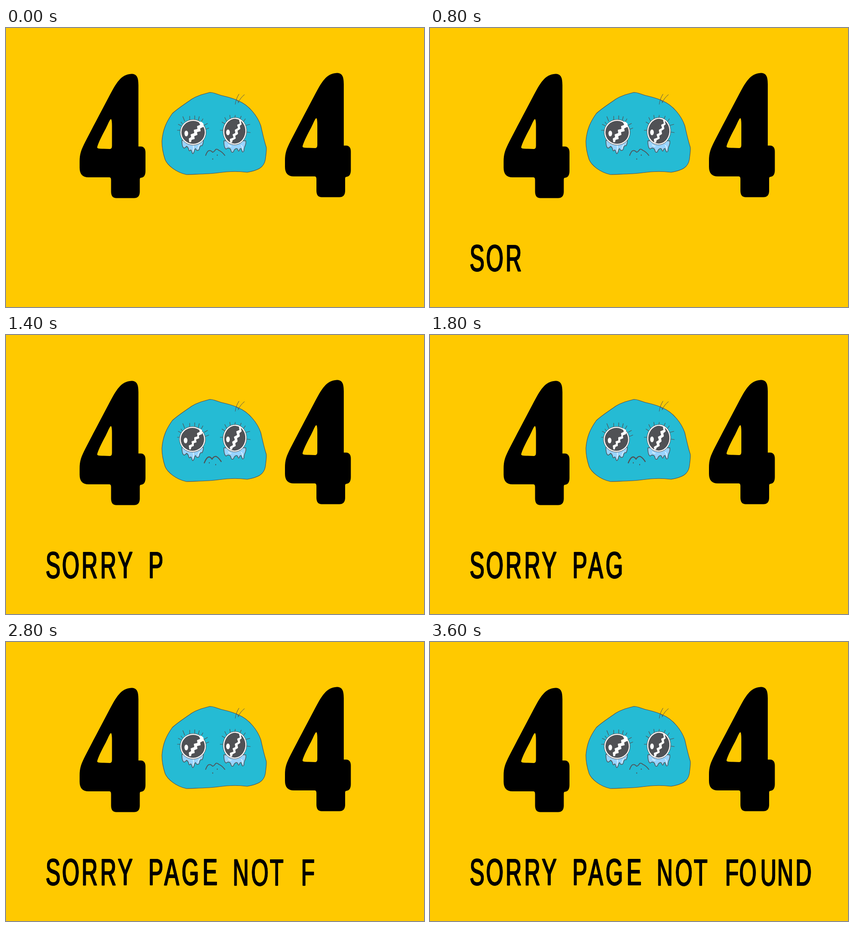
An HTML page with a canvas for the animation above (3.8 s loop, 917 by 611 pixels).

```html
<!DOCTYPE html>
<html lang="en">
<head>
<meta charset="utf-8">
<title>404</title>
<style>
  html, body { margin: 0; width: 100%; height: 100%; overflow: hidden; background: #ffc900; }
  canvas { display: block; }
</style>
</head>
<body>
<canvas id="stage" width="917" height="611"></canvas>
<script>
const ctx = document.getElementById('stage').getContext('2d');
const STEP = 200, STEPS = 19;
const YELLOW = '#ffc900', BLUE = '#25bbd4', DARK = '#505155', TEAR = '#99d4ff';

const four = new Path2D(
  'M275 100.5C287 100.5 290.5 108 290.5 125V259.5H296Q306 260 306 273V313Q306 327 296 328Q293.5 328 293.5 332' +
  'V359Q293 372.5 281 372.5H242Q230.5 372.5 230.5 358V333Q230.5 327 227 327H181Q161.5 327 161.5 306V293' +
  'C161.5 275 165 267 174 249C189 220 207 186 225 152C242 120 252 101.5 275 100.5Z' +
  'M200 261C203 250 212 233 219 220C224 210 228 199 230.5 199.5Q232.5 201 232.5 215V258' +
  'Q232.5 265 228 265L214 264.5Q199 265 200 261Z');

const head = new Path2D(
  'M447 141C458 141 463 146 478 149C495 153 505 157 511 160C533 169 552 193 559 214' +
  'C563 231 566 246 571 261C572 268 570 279 569 288C566 306 552 312 529 316' +
  'C514 314 492 313 466 317C447 320 420 320 396 321C372 316 354 300 349 288' +
  'C343 270 342 256 342 248C344 222 352 205 365 187C377 176 390 168 407 156C420 148 432 145 447 141Z');
const hair = new Path2D('M511 145Q504 156 503 167M523 146Q514 153 509 164M506 157L511 163');

const lashes = new Path2D(
  'M378 211L384 214M376 224L382 224M384 206L387 210M388 194L392 204M403 193V201M414 192V200' +
  'M424 194L422 202M432 199L428 206M442 209L435 213M445 219L438 222' +
  'M474 206L480 210M470 224L476 224M480 196L484 204M491 191L492 198M503 191L502 197' +
  'M516 193L513 200M525 199L521 205M535 211L527 213M536 229L529 228');

const tears = new Path2D(
  'M386 246Q386 262 391 263Q394 262 396 259Q400 261 401 267Q402 271 405 267Q407 267 408 272' +
  'Q410 279 413 270Q414 264 416 264Q418 269 421 268Q424 268 425 261Q427 256 430 258Q433 253 433 246Z' +
  'M478 247Q478 263 483 265Q487 261 491 264Q493 265 494 270Q496 274 499 271Q501 264 506 264' +
  'Q508 264 509 268Q511 272 513 265Q516 262 517 267Q519 275 522 269Q522 262 525 257Q527 252 526 247Z');
const tearShine = new Path2D('M411 258Q412 264 411 270M425 256Q422 259 421 264M516 257Q520 260 519 267M488 256Q490 259 494 259');

const rightEye = { x: 502, y: 226, rx: 26, ry: 30, tilt: 0.08 };
const poses = [
  {
    left: { x: 410.5, y: 228.5, rx: 28.5, ry: 28 },
    shines: new Path2D(
      'M423 206L426 212L419 215L420 221L412 223L413 230L405 233L406 239L401 242L402 250L406 250' +
      'L407 245L414 243L413 237L420 234L419 228L427 226L426 220L434 216L433 209L428 205Z' +
      'M511 200L513 209L507 212L509 219L502 223L503 230L497 233L499 240L491 243L492 251L496 251' +
      'L497 246L504 242L503 236L509 232L508 225L514 221L513 214L517 211L515 203Z'),
    mouth: new Path2D('M438 279Q441 271 444 269Q449 267 453 272Q456 272 460 266Q463 264 467 268Q474 271 480 279'),
    dots: [[453.5, 287], [463.5, 278.5]],
    weight: 1.8
  },
  {
    left: { x: 409, y: 228.5, rx: 28.5, ry: 28 },
    shines: new Path2D(
      'M423 204L425 212L419 215L420 222L413 224L413 231L407 233L408 239L401 242L402 250L405 251' +
      'L407 245L412 243L412 237L418 235L417 229L424 226L423 220L430 217L430 208Z' +
      'M511 200L512 208L505 211L507 219L500 223L502 230L496 234L498 241L491 245L492 251L496 251' +
      'L497 247L504 243L503 237L508 233L507 226L513 222L512 215L517 211L515 203Z'),
    mouth: new Path2D('M435 280Q440 268 445 267Q449 267 452 272Q456 265 461 266Q466 268 472 277'),
    dots: [[446, 280], [460, 284]],
    weight: 2.3
  }
];

// Each word: letters, baseline, pen position of every letter.
const words = [
  ['SORRY', 531.8, [87, 123.2, 165.8, 206.8, 245.3]],
  ['PAGE', 532.2, [312.5, 347.3, 385.3, 431.3]],
  ['NOT', 533.3, [497.5, 538, 579]],
  ['FOUND', 533.3, [647.5, 678.5, 724.8, 761.8, 801.8]]
];
const letters = words.flatMap(([word, y, xs]) => xs.map((x, i) => ({ char: word[i], x, y })));

function fill(path, color, rule) {
  ctx.fillStyle = color;
  ctx.fill(path, rule);
}

function stroke(path, color, width) {
  ctx.strokeStyle = color;
  ctx.lineWidth = width;
  ctx.stroke(path);
}

function ellipse(x, y, rx, ry, tilt = 0) {
  const path = new Path2D();
  path.ellipse(x, y, rx, ry, tilt, 0, Math.PI * 2);
  return path;
}

function drawFour(dx, dy) {
  ctx.save();
  ctx.translate(dx, dy);
  fill(four, '#000', 'evenodd');
  ctx.restore();
}

function drawEye({ x, y, rx, ry, tilt }) {
  const white = ellipse(x, y, rx, ry, tilt);
  fill(white, '#fff');
  stroke(white, DARK, 1);
  fill(ellipse(x, y, rx - 2.8, ry - 2.8, tilt), DARK);
  fill(ellipse(x - 15, y + 2.5, 4, 6.3), '#fff');
}

function drawFace(pose) {
  fill(head, BLUE);
  stroke(head, DARK, 1.1);
  stroke(hair, DARK, 1);
  stroke(lashes, DARK, 1.2);
  fill(tears, TEAR);
  stroke(tearShine, '#e4f4ff', 1.6);
  stroke(tears, DARK, 1.4);
  drawEye(pose.left);
  drawEye(rightEye);
  fill(pose.shines, '#fff');
  stroke(pose.mouth, DARK, pose.weight);
  for (const [x, y] of pose.dots) fill(ellipse(x, y, 1, 1.4), DARK);
}

function drawLetter({ char, x, y }) {
  ctx.save();
  ctx.translate(x, y);
  ctx.scale(0.6, 1);
  ctx.font = '81px "Liberation Sans", Arial, sans-serif';
  ctx.fillStyle = ctx.strokeStyle = '#000';
  ctx.lineWidth = 1.4;
  for (const dx of [-1, 1]) {
    ctx.fillText(char, dx, 0);
    ctx.strokeText(char, dx, 0);
  }
  ctx.restore();
}

function draw(now) {
  const step = Math.floor(now / STEP) % STEPS;
  ctx.lineJoin = ctx.lineCap = 'round';
  ctx.fillStyle = YELLOW;
  ctx.fillRect(0, 0, 917, 611);
  drawFour(0, 0);
  drawFour(450.5, -2);
  drawFace(poses[step % 2]);
  letters.slice(0, Math.max(0, step - 1)).forEach(drawLetter);
}

function tick() {
  draw(performance.now());
  requestAnimationFrame(tick);
}
tick();
</script>
</body>
</html>
```
